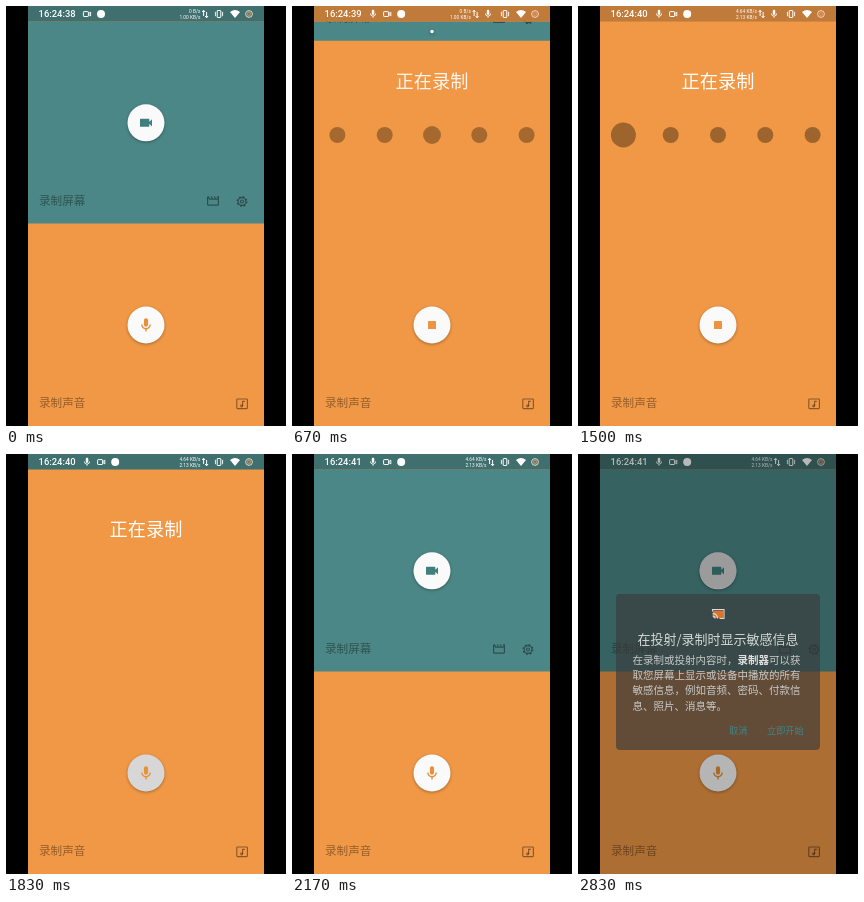
Recreate the animation shown at these times as an HTML page. Size 280x420 px, loop 2.99 s.

```html
<!DOCTYPE html>
<html lang="zh-CN">
<head>
<meta charset="utf-8">
<title>录制</title>
<style>
  html, body { margin: 0; width: 100%; height: 100%; overflow: hidden; background: #000; }
  svg { display: block; width: 100vw; height: 100vh; }
  text { font-family: "Noto Sans CJK SC", "Noto Sans CJK", sans-serif; }
  .latin { font-family: Roboto, sans-serif; fill: #fff; }
  .label { font-size: 11.6px; fill: #000; fill-opacity: .38; }
  .fab { filter: drop-shadow(0 1.5px 1.8px rgba(0, 0, 0, .32)); }
  .line { fill: none; stroke: #000; stroke-opacity: .42; stroke-width: 1.15; }
</style>
</head>
<body>
<svg viewBox="0 0 280 420">
  <defs>
    <path id="cam" d="M17 10.5V7c0-.55-.45-1-1-1H4c-.55 0-1 .45-1 1v10c0 .55.45 1 1 1h12c.55 0 1-.45 1-1v-3.5l4 4v-11l-4 4z"/>
    <path id="mic" d="M12 14c1.66 0 3-1.34 3-3V5c0-1.66-1.34-3-3-3S9 3.34 9 5v6c0 1.66 1.34 3 3 3zm5-3c0 2.76-2.24 5-5 5s-5-2.24-5-5H5c0 3.53 2.61 6.43 6 6.92V21h2v-3.08c3.39-.49 6-3.39 6-6.92h-2z"/>
    <path id="film" d="M4 6.47L5.76 10H20v8H4V6.47M22 4h-4l2 4h-3l-2-4h-2l2 4h-3l-2-4H8l2 4H7L5 4H4c-1.1 0-2 .9-2 2v12c0 1.1.9 2 2 2h16c1.1 0 2-.9 2-2V4z"/>
    <clipPath id="panelClip"><rect id="panelRect" x="22" y="15.5" width="236"/></clipPath>
    <clipPath id="camClip"><circle id="camEdge" cx="140"/></clipPath>
    <clipPath id="screenClip"><rect x="22" width="236" height="420"/></clipPath>
  </defs>
  <rect width="280" height="420"/>
  <g clip-path="url(#screenClip)">
    <rect x="22" width="236" height="420" fill="#f09846"/>

    <!-- sound panel -->
    <g id="recording">
      <text x="140" y="81.8" font-size="18.2" text-anchor="middle" fill="#fff">正在录制</text>
      <g id="dots" fill="#000" fill-opacity=".34"></g>
    </g>
    <text class="label" x="33" y="401">录制声音</text>
    <g class="line">
      <rect x="230.8" y="393" width="10.6" height="9.6" rx=".8"/>
      <path d="M236.6 400V395.3h2.2"/>
      <circle cx="235.6" cy="399.9" r=".9"/>
    </g>
    <circle class="fab" cx="140" cy="319" r="18.5" fill="#fafafa"/>
    <circle id="micPress" cx="140" cy="319" r="18.5"/>
    <use id="micIcon" href="#mic" transform="translate(131.6 310.9) scale(.7)" fill="#e8913a"/>
    <rect id="stopIcon" x="136" y="315" width="8" height="8" rx=".6" fill="#ee9340"/>

    <!-- screen panel -->
    <g clip-path="url(#panelClip)">
      <rect x="22" y="15" width="236" height="203" fill="#4b8786"/>
      <g id="panelFoot">
        <text class="label" x="33" y="-18.8">录制屏幕</text>
        <use href="#film" transform="translate(199.8 -29.7) scale(.6)" fill-opacity=".42"/>
        <g class="line" transform="translate(236 -22)">
          <circle r="3.9"/>
          <circle r="4.9" stroke-dasharray="1.92"/>
          <circle r="1.5"/>
        </g>
      </g>
      <circle id="camFab" class="fab" cx="140" fill="#fafafa"/>
      <g clip-path="url(#camClip)">
        <circle id="camPress" cx="140" cy="116.5" r="18.5"/>
        <circle id="ripple" cx="151" cy="115" r="11" fill-opacity=".07"/>
        <use id="camIcon" href="#cam" fill="#3f7f7e"/>
      </g>
    </g>

    <!-- status bar -->
    <rect id="bar" x="22" width="236" height="15.5"/>
    <text id="clock" class="latin" x="32.6" y="11.4" font-size="9.4" font-weight="500"></text>
    <use id="noteMic" href="#mic" transform="translate(76 3) scale(.42)" fill="#fff"/>
    <g id="notes" fill="none" stroke="#fff" stroke-width="1">
      <rect x="77.4" y="5.6" width="5" height="4.9" rx=".6"/>
      <path d="M82.6 7.6l2-1.4v3.7l-2-1.4"/>
      <circle cx="95" cy="8" r="4" fill="#fff" stroke="none"/>
    </g>
    <g id="net">
      <text id="up" class="latin" x="194.4" y="6.9" font-size="4.8" text-anchor="end"></text>
      <text id="down" class="latin" x="194.4" y="13.2" font-size="4.8" text-anchor="end"></text>
      <path d="M197.6 10V4.4M196.2 6l1.4-1.8L199 6M200.6 6v5.6M199.2 10l1.4 1.8L202 10" fill="none" stroke="#fff"/>
    </g>
    <use id="sysMic" href="#mic" transform="translate(191 3) scale(.42)" fill="#fff"/>
    <g fill="none" stroke="#fff">
      <rect x="211.2" y="4.5" width="3.6" height="7" rx=".5"/>
      <path d="M209.4 5.8v4.4M216.6 5.8v4.4" stroke-width=".9"/>
      <path d="M224 6q5-4 10 0l-5 6z" fill="#fff" stroke="none"/>
      <circle cx="243" cy="8" r="3.4" stroke="#f3ded0" stroke-width=".9"/>
      <rect x="241.8" y="6" width="2.4" height="4" rx="1" stroke="#f0a070" stroke-width=".9"/>
    </g>

    <!-- capture prompt -->
    <g id="prompt">
      <rect x="22" width="236" height="420" fill-opacity=".28"/>
      <rect x="38" y="140" width="204" height="156" rx="4" fill="#3c3c3c" fill-opacity=".66"/>
      <rect x="135" y="156.5" width="10" height="7.5" fill="#d8742c"/>
      <g fill="none" stroke="#d9dcdc" stroke-width="1.1">
        <path d="M134.5 157.5v-2h11.5v9h-4.5M134.5 159.6q5 0 5 5M134.5 162q2.6 0 2.6 2.6"/>
      </g>
      <text x="140" y="189.8" font-size="13" text-anchor="middle" fill="#d4d8d8">在投射/录制时显示敏感信息</text>
      <g font-size="10.5" fill="#c6cac9">
        <text x="54.5" y="210">在录制或投射内容时，<tspan font-weight="700" fill="#dde0df">录制器</tspan>可以获</text>
        <text x="54.5" y="225.2">取您屏幕上显示或设备中播放的所有</text>
        <text x="54.5" y="240.4">敏感信息，例如音频、密码、付款信</text>
        <text x="54.5" y="255.6">息、照片、消息等。</text>
      </g>
      <g font-size="9.2" fill="#3f8588">
        <text x="151" y="280.4">取消</text>
        <text x="189" y="280.4">立即开始</text>
      </g>
    </g>
  </g>
</svg>
<script>
const LOOP = 2990, TOP = 15.5, FULL = 202, RADIUS = 18.5, SLIDE = 300;
const TICKS = [0, 170, 330, 500, 670, 830, 1000, 1170, 1330, 1500, 1670, 1830, 2000, 2170, 2330, 2670, 2830];

// Each step: [start, value], held until the next one.
const MIC_PRESS = [[0, 0], [170, .08], [330, .14], [500, .06], [670, 0], [1670, .09], [1830, .14], [2000, .05], [2170, 0]];
const CAM_PRESS = [[0, 0], [2670, .14]];
const DOT_RADII = [
  [670, [8, 8, 9, 8, 8]],
  [830, [8, 8, 11, 8, 8]],
  [1000, [8, 11.3, 8, 11.3, 8]],
  [1170, [11.3, 8, 9, 8, 11.3]],
  [1330, [9, 9, 11, 9, 9.5]],
  [1500, [12.5, 8, 8, 8, 8]],
  [1670, [0, 0, 0, 0, 0]]
];

const $ = id => document.getElementById(id);
const set = (id, attrs) => { for (const k in attrs) $(id).setAttribute(k, attrs[k]); };
const show = (id, on) => set(id, { visibility: on ? 'visible' : 'hidden' });
const within = (t, a, b) => t >= a && t < b;
const held = (steps, t) => steps.reduce((v, [at, next]) => t >= at ? next : v, steps[0][1]);
const ease = u => (1 - Math.cos(Math.PI * Math.min(1, Math.max(0, u)))) / 2;

const dots = [0, 1, 2, 3, 4].map(i => {
  const dot = document.createElementNS('http://www.w3.org/2000/svg', 'circle');
  dot.setAttribute('cx', 45.4 + 47.3 * i);
  dot.setAttribute('cy', 129);
  return $('dots').appendChild(dot);
});

function drawPanels(t) {
  const open = 1 - ease((t - 430) / SLIDE) + ease((t - 1860) / SLIDE);
  const height = FULL * open, mid = TOP + height / 2 + .3, r = RADIUS * open;
  set('panelRect', { height });
  set('panelFoot', { transform: `translate(0 ${TOP + height})` });
  for (const id of ['camFab', 'camEdge']) set(id, { cy: mid, r });
  // The glyph keeps its inset from the button's top left corner.
  const inset = RADIUS - r - 8;
  set('camIcon', { transform: `translate(${140 + inset} ${mid + inset}) scale(.667)` });
  set('camPress', { 'fill-opacity': held(CAM_PRESS, t) });
  show('ripple', within(t, 2330, 2670));

  const recording = within(t, 330, 1670);
  set('recording', { opacity: 1 - open });
  set('micPress', { 'fill-opacity': held(MIC_PRESS, t) });
  show('micIcon', !recording);
  show('stopIcon', recording);
  const radii = held(DOT_RADII, t);
  dots.forEach((dot, i) => dot.setAttribute('r', radii[i]));
}

function drawStatus(t) {
  const listening = within(t, 500, 1830), noted = t >= 670, busy = t >= 1170;
  set('bar', { fill: within(t, 330, 1830) ? '#c07a39' : '#3f6f6e' });
  $('clock').textContent = '16:24:' + (38 + Math.floor((t + 830) / 1000));
  $('up').textContent = busy ? '4.64 KB/s' : '0 B/s';
  $('down').textContent = busy ? '2.13 KB/s' : '1.00 KB/s';
  set('net', { transform: `translate(${listening ? -15.5 : 0} 0)` });
  set('notes', { transform: `translate(${noted ? 14.2 : 0} 0)` });
  show('noteMic', noted);
  show('sysMic', listening);
}

function draw(now) {
  const time = (now - start + LOOP) % LOOP;
  const t = TICKS.filter(tick => tick <= time).pop();
  drawPanels(t);
  drawStatus(t);
  show('prompt', t >= 2830);
}

const start = performance.now();
(function frame() {
  draw(performance.now());
  requestAnimationFrame(frame);
})();
</script>
</body>
</html>
```
